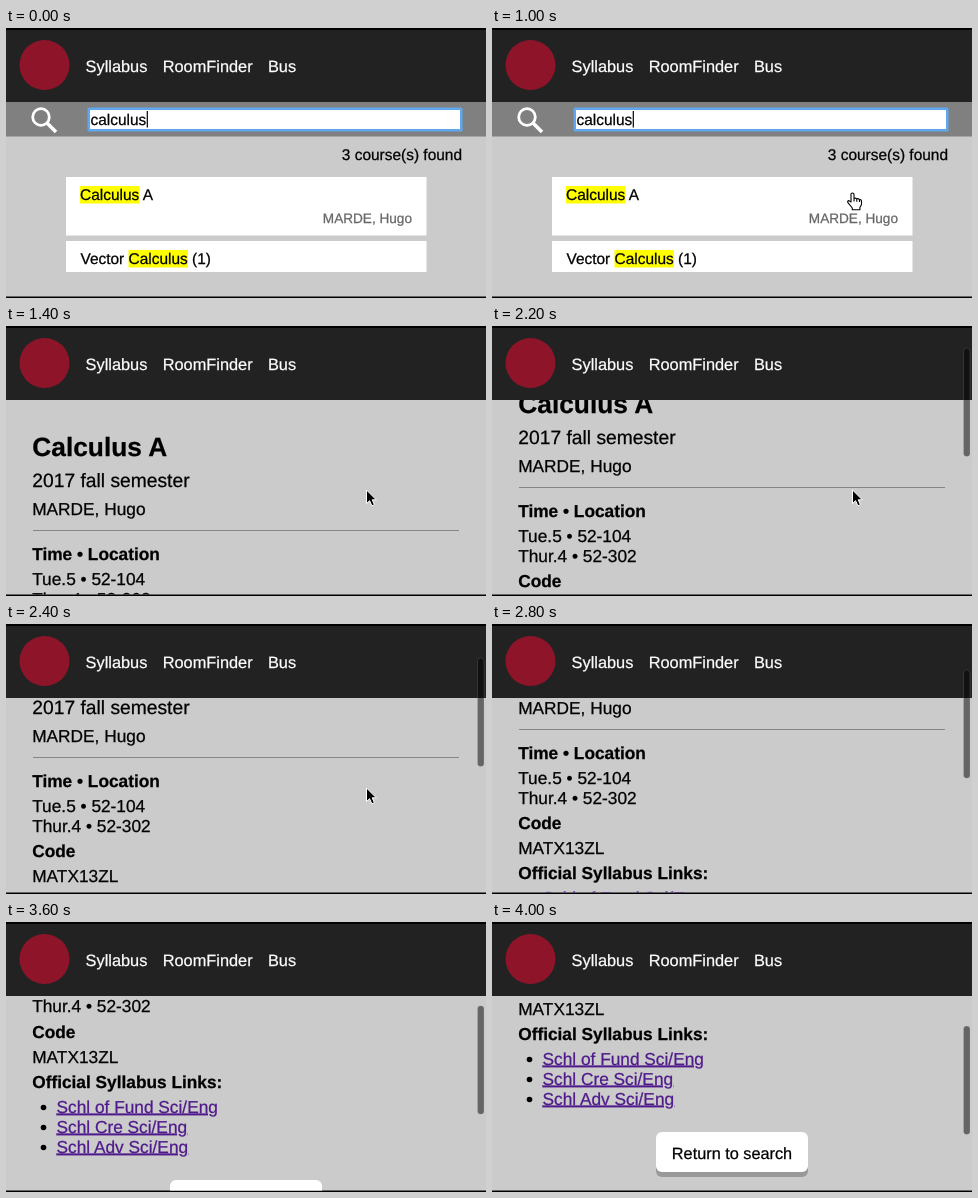
Write an HTML page that moves like this. It is 480 px wide and 270 px high and loops after 4600 ms.

```html
<!DOCTYPE html>
<html lang="en">
<head>
<meta charset="utf-8">
<title>Course search</title>
<style>
  html, body { margin: 0; width: 100%; height: 100%; overflow: hidden; background: #000; }
  svg { display: block; width: 100vw; height: 100vh; }
  text {
    font-family: "Liberation Sans", Arial, Helvetica, sans-serif;
    text-rendering: geometricPrecision;
    white-space: pre;
    stroke: #000;
    stroke-width: .25;
  }
  .nav { font-size: 16.35px; fill: #fff; stroke: #fff; }
  .find { font-size: 15.45px; }
  .teacher { font-size: 13.6px; fill: #666; stroke: #666; text-anchor: end; }
  .body { font-size: 17.3px; }
  .bold { font-weight: bold; }
  .link { fill: #4f1a8b; stroke: #4f1a8b; text-decoration: underline; }
</style>
</head>
<body>
<svg viewBox="0 0 480 270">
  <defs>
    <clipPath id="view"><rect y="2" width="480" height="266.5"/></clipPath>
  </defs>
  <rect width="480" height="270"/>
  <g clip-path="url(#view)">
    <rect y="2" width="480" height="267" fill="#cbcbcb"/>

    <g id="search">
      <rect y="74" width="480" height="34.5" fill="#808080"/>
      <g fill="none" stroke="#fff" stroke-width="2.8">
        <circle cx="35" cy="89" r="8.3"/>
        <path d="M41 95L50 104" stroke-width="3.6"/>
      </g>
      <rect x="81.5" y="79.5" width="375" height="24" rx="1.5" fill="#5fa8ee"/>
      <rect x="84" y="82" width="370" height="19" fill="#fff"/>
      <text class="find" x="84.5" y="97">calculus</text>
      <rect x="140.7" y="83" width="1.2" height="16.5"/>
      <text class="find" x="456" y="132" text-anchor="end">3 course(s) found</text>

      <rect x="60" y="149" width="360.5" height="58.5" fill="#fff"/>
      <rect x="74" y="158" width="59.5" height="17.5" fill="#ff0"/>
      <text class="find" x="74" y="172">Calculus A</text>
      <text class="teacher" x="406" y="194.5">MARDE, Hugo</text>

      <rect x="60" y="213" width="360.5" height="31" fill="#fff"/>
      <rect x="122.5" y="222" width="59.5" height="17.5" fill="#ff0"/>
      <text class="find" x="74.5" y="236">Vector Calculus (1)</text>
    </g>

    <g id="course">
      <text class="bold" x="26.3" y="129.6" font-size="26.3">Calculus A</text>
      <text x="26.3" y="160.8" font-size="19.25">2017 fall semester</text>
      <rect x="27" y="204" width="426" height="1" fill="#858585"/>
      <g id="details"></g>
      <rect x="164" y="452" width="152" height="39.5" rx="6" fill="#999"/>
      <rect x="164" y="446.5" width="152" height="40" rx="6" fill="#fff"/>
      <text x="240" y="473.5" font-size="16.3" text-anchor="middle">Return to search</text>
    </g>

    <rect y="2" width="480" height="72" fill="#222"/>
    <circle cx="38.5" cy="37" r="25" fill="#8e1529"/>
    <text class="nav" x="79.6" y="44">Syllabus</text>
    <text class="nav" x="156.7" y="44">RoomFinder</text>
    <text class="nav" x="261.9" y="44">Bus</text>

    <rect id="thumb" x="471.5" width="6.5" height="108.5" rx="3.25"
      fill="#000" fill-opacity=".5" stroke="#fff" stroke-opacity=".15" stroke-width=".8"/>

    <path id="arrow" fill="#000" stroke="#fff" stroke-width="1" stroke-linejoin="round"
      d="M0 0V13.6L3.1 10.7L5.4 15.8L7.9 14.7L5.7 9.8H9.8Z"/>
    <path id="hand" fill="#fff" stroke="#000" stroke-width="1.1" stroke-linejoin="round"
      d="M-1.5 9V1.4Q-1.5 0 0 0T1.5 1.4V5.5Q3 4.4 4.3 6Q5.8 5 7 6.7Q9 6.2 9 8.4V11.5
         L7.4 14.5V16.8H-.2V15L-4.6 9.6Q-5.4 7.8-3.6 7.6ZM1.5 5.5V8.5M4.3 6V8.8M7 6.7V9"/>
  </g>
</svg>
<script>
const LOOP = 4600;
const OPEN = 1200;     // result clicked, page still empty
const LOADED = 1400;
const SCROLLED = 2200;
const HIDE_POINTER = 2600;

// Three flicks: [time, scroll offset]
const scrollSteps = [
  [0, 0], [2200, 43], [2400, 71], [2600, 82], [2800, 99], [3000, 135],
  [3200, 150], [3600, 188.5], [3800, 221], [4000, 236.5]
];
// [time, x, y]
const pointerSteps = [[600, 424, 222], [800, 389, 192], [1000, 360.5, 165]];

const el = id => document.getElementById(id);
const [search, course, thumb, arrow, hand] =
  ["search", "course", "thumb", "arrow", "hand"].map(el);

const line = (y, text, style = "", x = 26.2) =>
  `<text class="body ${style}" x="${x}" y="${y}">${text}</text>`;
const link = (y, text) =>
  `<circle cx="37.5" cy="${y - 5}" r="2.8"/>` + line(y, text, "link", 50.5);

el("details").innerHTML = [
  line(189, "MARDE, Hugo"),
  line(233.8, "Time • Location", "bold"),
  line(258.5, "Tue.5 • 52-104"),
  line(278.5, "Thur.4 • 52-302"),
  line(304, "Code", "bold"),
  line(329, "MATX13ZL"),
  line(354, "Official Syllabus Links:", "bold"),
  link(379, "Schl of Fund Sci/Eng"),
  link(399, "Schl Cre Sci/Eng"),
  link(419, "Schl Adv Sci/Eng")
].join("");

const show = (node, on) => node.setAttribute("display", on ? "inline" : "none");
const move = (node, x, y) => node.setAttribute("transform", `translate(${x} ${y})`);
const stepAt = (steps, t) => steps.filter(step => step[0] <= t).pop();

function render(t) {
  show(search, t < OPEN);
  show(course, t >= LOADED);

  const scroll = stepAt(scrollSteps, t)[1];
  move(course, 0, -scroll);
  show(thumb, t >= SCROLLED);
  thumb.setAttribute("y", 3.8 + scroll * 0.424);

  const pointer = stepAt(pointerSteps, t);
  const visible = pointer && t < HIDE_POINTER;
  const overCard = t >= 800 && t < OPEN;
  show(arrow, visible && !overCard);
  show(hand, visible && overCard);
  if (visible) {
    const [, x, y] = pointer;
    move(arrow, x, y - 1);
    move(hand, x, y);
  }
}

function tick() {
  render(performance.now() % LOOP);
  requestAnimationFrame(tick);
}
tick();
</script>
</body>
</html>
```
